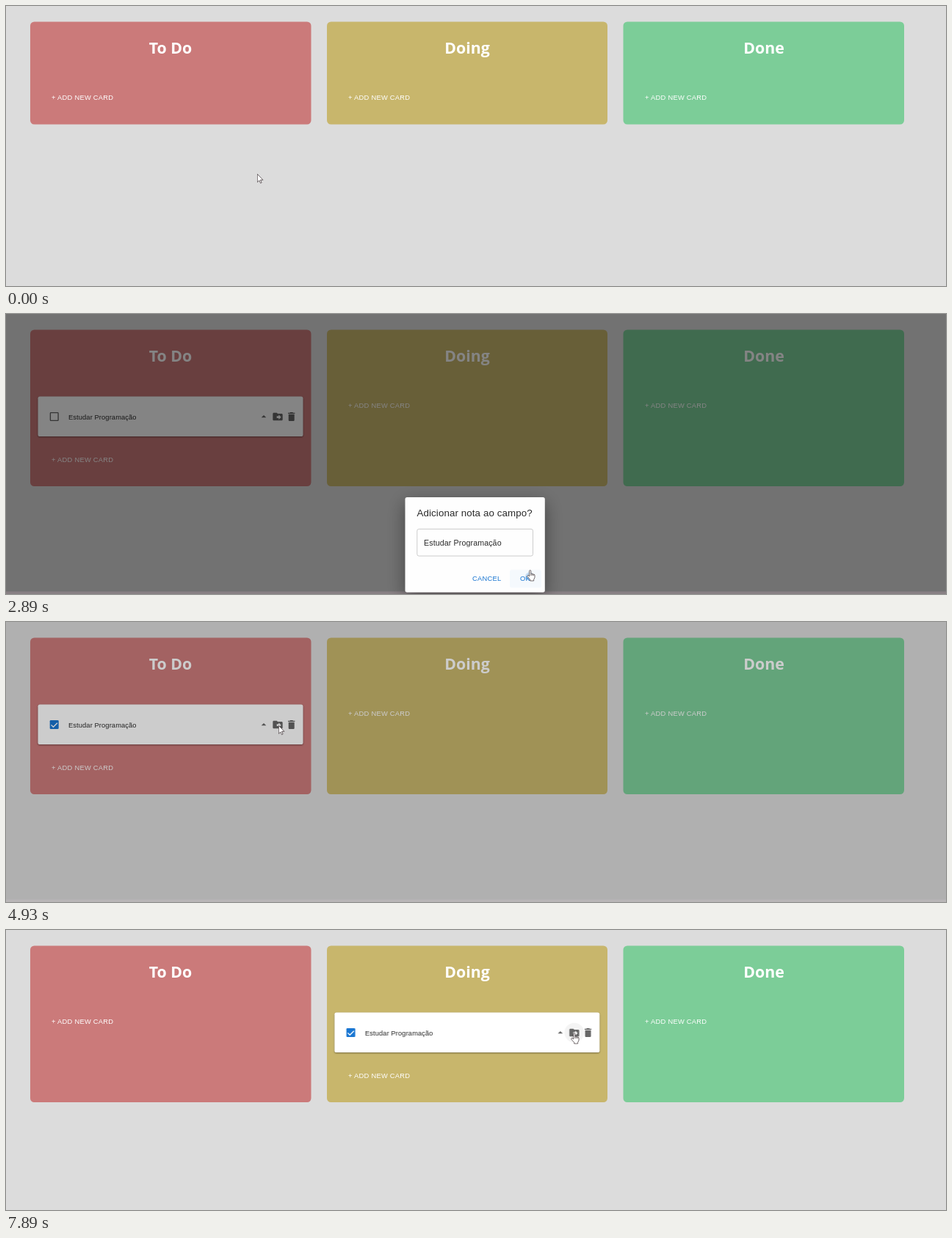
Animation, 1280 px wide and 382 px high, one loop 8000 ms. Source, as an HTML page:

```html
<!DOCTYPE html>
<html lang="pt">
<head>
<meta charset="utf-8">
<title>Board</title>
<style>
html, body { margin: 0; width: 100%; height: 100%; overflow: hidden; background: #dcdcdc; }
svg { display: block; width: 100%; height: 100%; font: 9.333px "Liberation Sans", Arial, sans-serif; }

/* --k names the keyframes an element plays */
.step { animation: var(--k) 8s step-end infinite; }
.ease { animation: var(--k) 8s ease-in-out infinite; }

.heading { font: bold 21.3px "Open Sans", "Noto Sans", sans-serif; text-anchor: middle; }
.button { letter-spacing: .02857em; }
.title { font-size: 13.333px; letter-spacing: .0075em; }
.input { font-size: 10.667px; letter-spacing: .00938em; }
.note { letter-spacing: .01071em; }
.hint { font: 8.1px "Open Sans", "Noto Sans", sans-serif; }
.paper { filter: drop-shadow(0 1px 1px rgba(0,0,0,.4)); }
.dialog { filter: drop-shadow(0 8px 12px rgba(0,0,0,.42)); }
.popup { filter: drop-shadow(0 0 1px rgba(0,0,0,.3)); }
.blue { fill: #1976d2; }
.ink { fill: #2b2b2b; }

/* board */
@keyframes grow { 0% { height: 140px } 35.6% { height: 213.5px } }
@keyframes add-todo { 0% { transform: none } 35.6% { transform: translateY(73.6px) } 73.2% { transform: none } }
@keyframes add-doing { 0% { transform: none } 73.2% { transform: translateY(73.6px) } }
@keyframes card-todo { 0% { opacity: 0 } 35.6% { opacity: 1 } 73.2% { opacity: 0 } }
@keyframes card-doing { 0% { opacity: 0 } 73.2% { opacity: 1 } }
@keyframes empty-todo { 0% { opacity: 1 } 46.9% { opacity: 0 } }
@keyframes tick-todo { 0% { opacity: 0 } 46.9% { opacity: 1 } }
@keyframes empty-doing { 0% { opacity: 1 } 89.2% { opacity: 0 } }
@keyframes tick-doing { 0% { opacity: 0 } 89.2% { opacity: 1 } }
@keyframes glow-todo {
  0%, 44.3% { opacity: 0 } 46%, 46.9% { opacity: .4 }
  47.8%, 50.6% { opacity: 1 } 52.3%, 100% { opacity: 0 }
}
@keyframes glow-doing {
  0%, 84.5% { opacity: 0 } 86%, 89.2% { opacity: .4 }
  90%, 95% { opacity: 1 } 97.3%, 100% { opacity: 0 }
}
@keyframes halo-todo { 0%, 54% { opacity: 0 } 55.5%, 60% { opacity: 1 } 61.5%, 100% { opacity: 0 } }
@keyframes halo-doing { 0%, 96% { opacity: 0 } 97.8%, 100% { opacity: 1 } }

/* dialogs */
@keyframes shade {
  0%, 9.4% { opacity: 0 } 12.2%, 35.8% { opacity: 1 } 38.4%, 60.4% { opacity: 0 }
  63.2%, 73.8% { opacity: 1 } 76.4%, 100% { opacity: 0 }
}
@keyframes ask-note { 0%, 10.2% { opacity: 0 } 12.8%, 36.1% { opacity: 1 } 38.5%, 100% { opacity: 0 } }
@keyframes ask-move { 0%, 61.7% { opacity: 0 } 64.2%, 74.2% { opacity: 1 } 76.5%, 100% { opacity: 0 } }
@keyframes drop { 0% { transform: none } 35.6% { transform: translateY(9.7px) } }
@keyframes focus { 0% { opacity: 0 } 17.5% { opacity: 1 } 35.3% { opacity: 0 } }
@keyframes suggest { 0% { opacity: 0 } 18.4% { opacity: 1 } 25.3% { opacity: 0 } }
@keyframes type { 0% { fill: transparent } 25.3% { fill: #2b2b2b } }
@keyframes caret {
  0% { transform: none } 25.3% { transform: none; animation-timing-function: steps(19) }
  31%, 100% { transform: translateX(106px) }
}
@keyframes hover-ok { 0%, 33.6% { opacity: 0 } 35%, 100% { opacity: 1 } }
@keyframes hover-doing { 0%, 67.6% { opacity: 0 } 69.4%, 100% { opacity: 1 } }
@keyframes ripple-ok { 0%, 35.3% { r: 0 } 37%, 100% { r: 12px } }
@keyframes ripple-doing { 0%, 73.5% { r: 0 } 75.3%, 100% { r: 11px } }
#line tspan { animation: type 8s step-end calc(var(--i) * 24ms) infinite backwards; }

/* pointer */
@keyframes path {
  0%, .6% { transform: translate(342px, 229px) }
  7%, 10.5% { transform: translate(112px, 124px) }
  16.5%, 31% { transform: translate(619px, 304px) }
  34.5%, 36.3% { transform: translate(714px, 350px) }
  44.5% { transform: translate(72px, 141px) }
  48% { transform: translate(72px, 141px); animation-timing-function: ease-in }
  50.1% { transform: translate(225px, 168px); animation-timing-function: linear }
  51.4% { transform: translate(325px, 170px); animation-timing-function: ease-out }
  55%, 62.5% { transform: translate(371px, 141px) }
  69%, 73.4% { transform: translate(643px, 360px) }
  73.5% { transform: translate(643px, 360px); animation-timing-function: ease-in }
  74.4% { transform: translate(645px, 324px); animation-timing-function: linear }
  78.1% { transform: translate(600px, 198px); animation-timing-function: linear }
  82.5% { transform: translate(492px, 163px); animation-timing-function: ease-out }
  85%, 91.2% { transform: translate(471px, 141px) }
  97.5%, 100% { transform: translate(774px, 141px) }
}
@keyframes arrow {
  0% { opacity: 1 } 6% { opacity: 0 } 9.6% { opacity: 1 } 15.6% { opacity: 0 }
  32.4% { opacity: 1 } 33.6% { opacity: 0 } 36.8% { opacity: 1 } 44% { opacity: 0 }
  49.6% { opacity: 1 } 54% { opacity: 0 } 60.6% { opacity: 1 } 68% { opacity: 0 }
  73.8% { opacity: 1 } 84% { opacity: 0 }
}
@keyframes hand {
  0% { opacity: 0 } 6% { opacity: 1 } 9.6% { opacity: 0 } 33.6% { opacity: 1 }
  36.8% { opacity: 0 } 44% { opacity: 1 } 49.6% { opacity: 0 } 54% { opacity: 1 }
  60.6% { opacity: 0 } 68% { opacity: 1 } 73.8% { opacity: 0 } 84% { opacity: 1 }
}
@keyframes beam { 0% { opacity: 0 } 15.6% { opacity: 1 } 32.4% { opacity: 0 } }
</style>
</head>
<body>
<svg viewBox="0 0 1280 382" preserveAspectRatio="none">
  <defs>
    <rect id="paper" class="paper" x="43.5" y="112.5" width="361" height="54.6" rx="2.7" fill="#fff"/>
    <g id="glow">
      <rect x="44" y="118" width="345" height="44" fill-opacity=".1"/>
      <circle cx="69" cy="140" r="16" fill-opacity=".06"/>
    </g>
    <circle id="halo" cx="370" cy="140" r="13.3" fill-opacity=".045"/>
    <g id="parts">
      <text class="note ink" x="85" y="143.5">Estudar Programação</text>
      <g fill="#666">
        <path transform="translate(343 132) scale(.667)" d="M7 14l5-5 5 5z"/>
        <path transform="translate(362 132) scale(.667)" d="M20 6h-8l-2-2H4c-1.1 0-2 .9-2 2v12c0 1.100.9 2 2 2h16c1.100 0 2-.9 2-2V8c0-1.100-.9-2-2-2zm-6 12v-3h-4v-4h4V8l5 5z"/>
        <path transform="translate(380.700 132) scale(.667)" d="M6 19c0 1.100.9 2 2 2h8c1.100 0 2-.9 2-2V7H6zM19 4h-3.500l-1-1h-5l-1 1H5v2h14z"/>
      </g>
    </g>
    <rect id="empty" x="60.400" y="134.700" width="10.700" height="10.700" rx=".7" fill="none" stroke="#666" stroke-width="1.333"/>
    <g id="tick">
      <rect class="blue" x="59.700" y="134" width="12" height="12" rx="1.300"/>
      <path d="M61.500 140.400l2.900 2.900 5.500-5.600" fill="none" stroke="#fff" stroke-width="1.333"/>
    </g>
  </defs>

  <rect width="1280" height="382" fill="#dcdcdc"/>
  <g class="columns">
    <rect class="step" style="--k:grow" x="33" y="21.500" width="382.500" height="140" rx="5.500" fill="#cb7a7a"/>
    <rect class="step" style="--k:grow" x="437" y="21.500" width="382" height="140" rx="5.500" fill="#c8b66c"/>
    <rect class="step" style="--k:grow" x="840.500" y="21.500" width="382.500" height="140" rx="5.500" fill="#7ccd98"/>
  </g>
  <g fill="#fff">
    <g class="heading">
      <text x="224" y="64.500">To Do</text>
      <text x="628" y="64.500">Doing</text>
      <text x="1032" y="64.500">Done</text>
    </g>
    <g class="button">
      <text class="step" style="--k:add-todo" x="62" y="128">+ ADD NEW CARD</text>
      <text class="step" style="--k:add-doing" x="466" y="128">+ ADD NEW CARD</text>
      <text x="870" y="128">+ ADD NEW CARD</text>
    </g>
  </g>

  <g class="step" style="--k:card-todo">
    <use href="#paper"/>
    <use href="#glow" class="ease" style="--k:glow-todo"/>
    <use href="#halo" class="ease" style="--k:halo-todo"/>
    <use href="#parts"/>
    <use href="#empty" class="step" style="--k:empty-todo"/>
    <use href="#tick" class="step" style="--k:tick-todo"/>
  </g>
  <g transform="translate(403.800)">
    <g class="step" style="--k:card-doing">
      <use href="#paper"/>
      <use href="#glow" class="ease" style="--k:glow-doing"/>
      <use href="#halo" class="ease" style="--k:halo-doing"/>
      <use href="#parts"/>
      <use href="#empty" class="step" style="--k:empty-doing"/>
      <use href="#tick" class="step" style="--k:tick-doing"/>
    </g>
  </g>

  <g class="ease" style="--k:shade">
    <rect width="1280" height="382" fill-opacity=".5"/>
    <rect y="378.500" width="1280" height="3.500" fill="#857d81"/>
  </g>

  <g class="ease" style="--k:ask-note">
    <g class="step" style="--k:drop">
      <rect class="dialog" x="543.500" y="240.400" width="190.300" height="129.600" rx="2.700" fill="#fff"/>
      <text class="title ink" x="559.500" y="266.500">Adicionar nota ao campo?</text>
      <rect x="559.800" y="283.700" width="157.700" height="36.700" rx="2.500" fill="#fff" stroke="#c0c0c0" stroke-width=".8"/>
      <rect class="step" style="--k:focus" x="560.200" y="284.100" width="157" height="36.200" rx="2.300" fill="none" stroke="#1976d2" stroke-width="1.400"/>
      <text id="line" class="input" x="569" y="306"></text>
      <g class="step" style="--k:focus">
        <rect class="ease" style="--k:caret" x="569" y="296.500" width=".9" height="12"/>
      </g>
      <rect class="ease blue" style="--k:hover-ok" x="686" y="339.300" width="43" height="24.500" rx="2.700" fill-opacity=".04"/>
      <circle class="ease blue" style="--k:ripple-ok" cx="713" cy="348.500" fill-opacity=".22"/>
      <g class="button blue">
        <text x="635" y="354.800">CANCEL</text>
        <text x="700" y="354.800">OK</text>
      </g>
      <g class="step" style="--k:suggest">
        <path class="popup" d="M625 390V329q0-2 2-2h6l5-4.500 5 4.500h84q2 0 2 2v61z" fill="#fff"/>
        <g class="hint ink">
          <text x="632.700" y="346">12312123</text>
          <text x="632.700" y="370">122</text>
        </g>
      </g>
    </g>
  </g>

  <g class="ease" style="--k:ask-move">
    <rect class="dialog" x="561.500" y="304.700" width="154.300" height="79" rx="2.700" fill="#fff"/>
    <text class="title ink" x="577.700" y="330.700">Deseja mover nota?</text>
    <rect class="ease blue" style="--k:hover-doing" x="619.500" y="353" width="42.500" height="24.500" rx="2.700" fill-opacity=".05"/>
    <circle class="ease blue" style="--k:ripple-doing" cx="643.500" cy="362" fill-opacity=".25"/>
    <g class="button blue">
      <text x="576.700" y="368.300">TO DO</text>
      <text x="624.300" y="368.300">DOING</text>
      <text x="674.300" y="368.300">DONE</text>
    </g>
  </g>

  <g class="ease" style="--k:path" fill="#fff" stroke="#2c2024" stroke-linejoin="round">
    <g class="step" style="--k:arrow">
      <path transform="scale(.667)" d="M.5.5v16.500l3.800-3.500 2.500 5.500 2.400-1.100-2.500-5.400h5.200z"/>
    </g>
    <g class="step" style="--k:hand">
      <path transform="translate(-5 -1) scale(.667)" d="M5.500 12V2.500a1.600 1.600 0 0 1 3.200 0V8q1.500-1 2.800.6 1.500-.8 2.600.7 2.400-.4 2.400 2.200v4l-2 4.500v2.500H7v-2.500L1.500 14q-1.200-2.500 1-3 1.500 0 3 2.500zM8.700 8v4m2.800-3.400V12m2.600-2.700V12"/>
    </g>
    <g class="step" style="--k:beam">
      <path d="M-2-5.200h1.400L0-4.700.6-5.200H2M0-4.700V4.700M-2 5.200h1.400L0 4.700l.6.500H2" fill="none" stroke-width=".8"/>
    </g>
  </g>
</svg>
<script>
// One span per letter, so that each can appear in turn.
document.getElementById('line').innerHTML = [...'Estudar Programação']
  .map((letter, i) => `<tspan style="--i:${i}">${letter}</tspan>`).join('');
</script>
</body>
</html>
```
